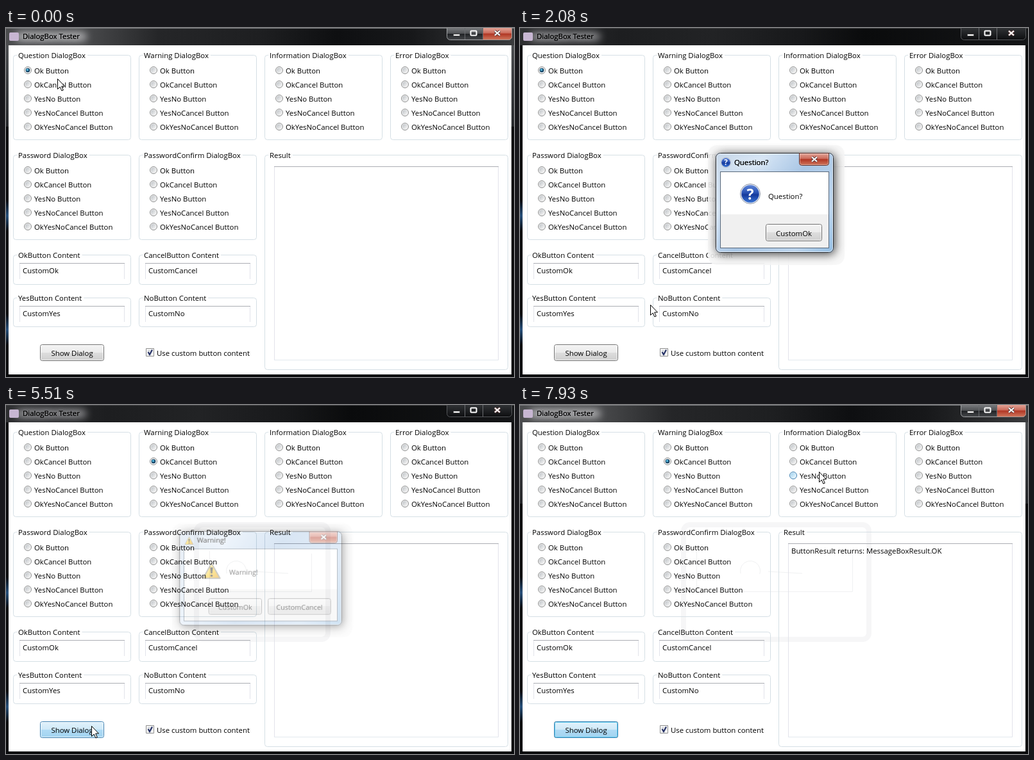
An HTML page with a canvas for the animation above (8 s loop, 792 px wide and 545 px high).

```html
<!DOCTYPE html>
<html lang="en">
<head>
<meta charset="utf-8">
<title>DialogBox Tester</title>
<style>
html, body { margin: 0; width: 100%; height: 100%; overflow: hidden; background: #000; }
canvas { display: block; width: 792px; height: 545px; }
</style>
</head>
<body>
<canvas id="stage" width="792" height="545"></canvas>
<script>
const stage = document.getElementById('stage').getContext('2d');
const sheet = document.createElement('canvas');
sheet.width = 792;
sheet.height = 545;
const layer = sheet.getContext('2d');
let c = stage;

const LOOP = 8000;
const FONT = '"Open Sans", "Noto Sans", sans-serif';
const clamp = v => Math.max(0, Math.min(1, v));
const ramp = (t, start, length) => clamp((t - start) / length);

// time, x, y of the pointer
const PATH = [
  [0, 80, 79], [460, 80, 79], [800, 38, 300], [1080, 58, 526], [1260, 92, 507],
  [1780, 92, 507], [2080, 203, 432], [2680, 400, 318], [3150, 400, 318],
  [3660, 310, 140], [4080, 277, 90], [4310, 277, 90], [4500, 250, 150],
  [5150, 133, 501], [5580, 133, 501], [5990, 238, 404], [6210, 345, 338],
  [6440, 360, 318], [6850, 360, 318], [7380, 409, 221], [7880, 466, 104], [8000, 466, 104]
];
const CLICKS = [[1310, 1470], [2860, 3110], [4120, 4290], [5200, 5380], [6620, 6840]];
const KINDS = ['Ok', 'OkCancel', 'YesNo', 'YesNoCancel', 'OkYesNoCancel'];
const GROUPS = [
  ['Question', 11, 42], ['Warning', 207, 42], ['Information', 403, 42],
  ['Error', 599, 42], ['Password', 11, 198], ['PasswordConfirm', 207, 198]
];
const FIELDS = [['Ok', 11, 354, 46], ['Cancel', 207, 354, 46], ['Yes', 11, 421, 45], ['No', 207, 421, 45]];
const DIALOGS = [
  { text: 'Question?', x: 305, w: 184, open: 1550, close: 3150, icon: question, iconX: 359, textX: 387,
    buttons: [['CustomOk', 383, 88]] },
  { text: 'Warning!', x: 263, w: 268, open: 5430, close: 6870, icon: warning, iconX: 316, textX: 345,
    buttons: [['CustomOk', 311, 88], ['CustomCancel', 409, 104]] }
];
const SKINS = {
  normal: ['#f4f4f4', '#ebebeb', '#dddddd', '#cfcfcf', '#707070'],
  hover: ['#e2f2fb', '#cfe9f8', '#b0dbf5', '#a1d3f0', '#3c7fb1'],
  pressed: ['#e1f2fb', '#c4e5f6', '#98d1ef', '#7fc1e6', '#2c628b']
};
let mouse;

function gradient(x0, y0, x1, y1, ...stops) {
  const g = c.createLinearGradient(x0, y0, x1, y1);
  stops.forEach(([at, color]) => g.addColorStop(at, color));
  return g;
}
function rect(x, y, w, h, color) {
  c.fillStyle = color;
  c.fillRect(x, y, w, h);
}
function rounded(x, y, w, h, r, fill, stroke, width = 1) {
  c.beginPath();
  c.roundRect(x, y, w, h, r);
  if (fill) { c.fillStyle = fill; c.fill(); }
  if (stroke) { c.strokeStyle = stroke; c.lineWidth = width; c.stroke(); }
}
function shape(points, fill, stroke, width = 1) {
  c.beginPath();
  for (let i = 0; i < points.length; i += 2) c.lineTo(points[i], points[i + 1]);
  c.closePath();
  c.fillStyle = fill;
  c.fill();
  if (stroke) { c.strokeStyle = stroke; c.lineWidth = width; c.stroke(); }
}
function disc(x, y, r, fill, stroke) {
  c.beginPath();
  c.arc(x, y, r, 0, 7);
  c.fillStyle = fill;
  c.fill();
  if (stroke) { c.strokeStyle = stroke; c.lineWidth = 1; c.stroke(); }
}
function label(s, x, y, align = 'left') {
  c.font = '11.4px ' + FONT;
  c.textAlign = align;
  c.fillStyle = '#000';
  c.fillText(s, x, y);
}
function glowLabel(s, x, y, color) {
  c.save();
  c.shadowColor = color;
  c.shadowBlur = 8;
  label(s, x, y);
  c.restore();
  label(s, x, y);
}
const inside = (x, y, w, h) =>
  mouse.x >= x && mouse.x < x + w && mouse.y >= y && mouse.y < y + h;

function pointer(t) {
  const i = Math.max(1, PATH.findIndex(p => p[0] > t));
  const [t0, x0, y0] = PATH[i - 1], [t1, x1, y1] = PATH[i];
  const k = (t - t0) / (t1 - t0);
  return { x: Math.round(x0 + (x1 - x0) * k), y: Math.round(y0 + (y1 - y0) * k),
    down: CLICKS.some(([a, b]) => t >= a && t < b) };
}

function button(s, x, y, w, h, focus = 0) {
  const over = inside(x, y, w, h);
  const skin = SKINS[over ? (mouse.down ? 'pressed' : 'hover') : 'normal'];
  const paint = k => gradient(0, y, 0, y + h, [0, k[0]], [.5, k[1]], [.5, k[2]], [1, k[3]]);
  rounded(x + .5, y + .5, w - 1, h - 1, 3, paint(skin), skin[4]);
  rounded(x + 1.5, y + 1.5, w - 3, h - 3, 2, null, 'rgba(255,255,255,.7)');
  if (focus && !over) {
    c.save();
    c.globalAlpha = focus;
    rounded(x + .5, y + .5, w - 1, h - 1, 3, paint(SKINS.hover), '#3c7fb1');
    rounded(x + 1.5, y + 1.5, w - 3, h - 3, 2, null, '#62cdee');
    c.restore();
  }
  label(s, x + w / 2, y + h / 2 + 5, 'center');
}

function radio(x, y, on, over) {
  disc(x, y, 5.5, over ? '#e4f3fc' : '#f4f4f4', over ? '#3c7fb1' : '#8e8f8f');
  const tones = over ? ['#a5d4f0', '#e8f6fd'] : ['#c4c8cc', '#f3f3f3'];
  disc(x, y, 4, gradient(x - 3, y - 3, x + 3, y + 3, [0, tones[0]], [1, tones[1]]));
  if (on) {
    disc(x, y, 3.3, '#17486a');
    disc(x - .6, y - .7, 1.8, '#54b6dc');
  }
}

function group(title, x, y, w, h) {
  rounded(x + .5, y + .5, w - 1, h - 1, 4, null, '#d5dfe5');
  c.font = '11.4px ' + FONT;
  rect(x + 6, y - 1, c.measureText(title).width + 5, 3, '#fff');
  label(title, x + 8, y + 5);
}

function textBox(x, y, w, h, closed) {
  rect(x, y, 1, h, '#e2e3ea');
  rect(x + w - 1, y, 1, h, '#e2e3ea');
  if (closed) rect(x, y + h - 1, w, 1, '#e3e9ef');
  rect(x, y, w, 1, '#abadb3');
}

function cross(x, y) {
  for (const [width, color] of [[4.2, '#5b3a3a'], [2.2, '#fff']]) {
    c.beginPath();
    c.moveTo(x - 4, y - 3.5); c.lineTo(x + 4, y + 3.5);
    c.moveTo(x + 4, y - 3.5); c.lineTo(x - 4, y + 3.5);
    c.strokeStyle = color;
    c.lineWidth = width;
    c.stroke();
  }
}
const red = (y, h) => gradient(0, y, 0, y + h,
  [0, '#e3a497'], [.45, '#cb6a5a'], [.5, '#b03523'], [1, '#cf745b']);

function windowFrame(active) {
  rect(0, 0, 792, 545, '#07080a');
  if (active) {
    rect(0, 0, 792, 27, gradient(0, 0, 792, 0, [0, '#4b4c4e'], [.16, '#48494b'], [.3, '#252628'],
      [.5, '#1e1f21'], [.65, '#0e0f11'], [.8, '#17181a'], [1, '#3a3b3d']));
    for (const x of [0, 788]) rect(x, 27, 4, 127, gradient(0, 27, 0, 154, [0, '#4c4e51'], [1, '#26282b']));
  } else {
    rect(0, 0, 792, 27, gradient(0, 0, 792, 0, [0, '#2e2f31'], [.2, '#1d1e20'], [.38, '#222325'],
      [.55, '#18191b'], [.68, '#0a0b0c'], [1, '#141517']));
  }
  for (const y of [268, 446]) {
    rect(0, y, 4, 50, gradient(0, y, 0, y + 50, [0, '#07080a'], [.5, '#28517c'], [1, '#07080a']));
  }
  rect(0, 0, 792, 1, active ? '#77797c' : '#404143');
  rect(4, 27, 784, 514, '#fff');

  c.save();
  c.filter = 'blur(6px)';
  rounded(14, 6, 112, 15, 8, active ? 'rgba(205,205,208,.7)' : 'rgba(185,185,188,.6)');
  c.restore();
  rounded(5, 7, 15, 13, 2, '#c7b6d2');
  glowLabel('DialogBox Tester', 26, 17, 'rgba(225,225,228,.7)');

  const glass = active
    ? gradient(0, 0, 0, 18, [0, '#77797c'], [.48, '#4e5053'], [.5, '#1e2023'], [1, '#45474a'])
    : gradient(0, 0, 0, 18, [0, '#303235'], [1, '#0e0f11']);
  rounded(687.5, -4, 101, 22.5, 5, glass, active ? '#a0a2a5' : '#55575a');
  if (active) rounded(743.5, -4, 45, 22.5, [0, 0, 5, 0], red(0, 18), '#a99b98');
  rect(715, 0, 1, 18, '#6a6c6f');
  rect(743, 0, 1, 18, '#6a6c6f');
  rounded(697.5, 9.5, 10, 3, 1, '#fff', '#444');
  rounded(724.5, 4.5, 9, 7, 1, null, '#fff', 2);
  cross(766, 8);
}

function question(x, y, s) {
  c.save();
  c.translate(x, y);
  c.scale(s, s);
  disc(0, 0, 15.5, '#e9edf4', '#8d96a8');
  disc(0, 0, 13.8, gradient(0, -14, 0, 14, [0, '#5f86d8'], [.45, '#2750b2'], [.55, '#153a9c'], [1, '#3a74d4']));
  c.font = 'bold 23px ' + FONT;
  c.textAlign = 'center';
  c.fillStyle = '#fff';
  c.fillText('?', 0, 8.5);
  c.restore();
}

function warning(x, y, s) {
  c.save();
  c.translate(x, y + 2 * s);
  c.scale(s, s);
  c.lineJoin = 'round';
  shape([0, -13, 14, 12, -14, 12], gradient(-8, -8, 10, 12, [0, '#ffe873'], [.5, '#fbc714'], [1, '#e79a06']), '#8d8a7c', 2);
  shape([-2.3, -6, 2.3, -6, 1.2, 4, -1.2, 4], '#1c1c1c');
  disc(0, 7.6, 1.9, '#1c1c1c');
  c.restore();
}

// faint outline that the latest closed dialog leaves on the window
function trace(t) {
  const d = DIALOGS.filter(d => t >= d.close + 150).pop();
  if (!d) return;
  rounded(d.x - 8, 187, d.w + 21, 179, 10, null, '#f6f6f7', 8);
  c.beginPath();
  c.moveTo(d.x + 12.5, 228);
  c.lineTo(d.x + 12.5, 291.5);
  c.lineTo(d.x + d.w - 12.5, 291.5);
  c.lineTo(d.x + d.w - 12.5, 232);
  c.moveTo(344, 262);
  c.arc(359, 259, 15.5, 2.9, 6.6);
  c.moveTo(387, 260);
  c.lineTo(440, 263);
  c.strokeStyle = '#f0f1f2';
  c.lineWidth = 1;
  c.stroke();
}

function paintDialog({ text, x, w, icon, iconX, textX, buttons }) {
  const end = x + w;
  rounded(x - 12, 183, w + 29, 187, 14, 'rgba(247,247,247,.88)');
  c.save();
  c.shadowColor = 'rgba(0,0,0,.75)';
  c.shadowBlur = 15;
  c.shadowOffsetX = c.shadowOffsetY = 2;
  rounded(x, 195, w, 156, 7, '#b9d0ea');
  c.restore();
  rounded(x + .5, 195.5, w - 1, 155, 7,
    gradient(x, 195, end, 351, [0, '#c7d7e8'], [.25, '#d6e5f5'], [.5, '#a9c6e5'], [.8, '#bdd5ed'], [1, '#92bde3']), '#20262e');
  rounded(x + 1.5, 196.5, w - 3, 153, 6, null, 'rgba(255,255,255,.7)');
  rect(x + 7, 224, w - 14, 120, '#59697b');
  rect(x + 8, 225, w - 16, 118, '#fff');
  rect(x + 8, 291, w - 16, 52, '#f0f0f0');

  icon(x + 16, 210, .5);
  glowLabel(text, x + 29, 214, 'rgba(255,255,255,.8)');
  rounded(end - 53.5, 195.5, 46, 19, [0, 0, 4, 4], red(196, 18), '#5c2a24');
  rounded(end - 52.5, 196.5, 44, 17, [0, 0, 3, 3], null, 'rgba(255,255,255,.4)');
  cross(end - 30, 205);

  icon(iconX, 259, 1);
  label(text, textX, 267);
  for (const [s, bx, bw] of buttons) button(s, bx, 306, bw, 27);
}

function dialog(d, t) {
  const a = ramp(t, d.open, 180) * (1 - ramp(t, d.close, 180));
  if (!a) return;
  layer.clearRect(0, 0, 792, 545);
  c = layer;
  paintDialog(d);
  c = stage;

  const s = .9 + .1 * a;
  c.save();
  c.globalAlpha = a;
  // while still faint, the text below shows through in full
  if (a < .6) c.globalCompositeOperation = 'multiply';
  c.translate(397, 230);
  c.scale(s, s);
  c.drawImage(sheet, -397, -230);
  c.restore();
}

function cursor() {
  const { x, y, down } = mouse;
  if (down) disc(x - 1, y + 1, 12, 'rgba(232,227,50,.8)');
  c.save();
  c.translate(x + .5, y + .5);
  shape([0, 0, 0, 16, 3.7, 12.5, 6.4, 18.5, 8.8, 17.5, 6.2, 11.5, 11, 11.5], '#fff', '#000');
  c.restore();
}

function draw(t) {
  mouse = pointer(t);
  const isOpen = DIALOGS.some(d => t >= d.open && t < d.close + 60);
  windowFrame(!isOpen);
  trace(t);

  const chosen = t < 4290 ? 0 : 1;
  GROUPS.forEach(([name, x, y], g) => {
    group(name + ' DialogBox', x, y, 184, 133);
    KINDS.forEach((kind, i) => {
      const cy = y + 24 + 22 * i;
      const over = !isOpen && inside(x + 17, cy - 7, 140, 14);
      radio(x + 23, cy, g === chosen && i === chosen, over);
      label(kind + ' Button', x + 33, cy + 5);
    });
  });
  FIELDS.forEach(([name, x, y, h]) => {
    group(name + 'Button Content', x, y, 184, h + 1);
    textBox(x + 10, y + 13, 164, 25);
    label('Custom' + name, x + 15, y + 29);
  });
  group('Result', 403, 198, 380, 336);
  textBox(418, 216, 350, 303, true);
  const hasResult = t >= 3740 && t < DIALOGS[1].open || t >= 7330;
  if (hasResult) label('ButtonResult returns: MessageBoxResult.OK', 423, 232);

  const focus = .7 * ramp(t, 3210, 700) * (1 - ramp(t, 4290, 200)) + ramp(t, 6930, 420);
  button('Show Dialog', 53, 494, 100, 26, focus);

  rounded(218.5, 500.5, 12, 12, 0, '#f4f4f4', '#8e8f8f');
  rect(221, 503, 8, 8, gradient(221, 503, 229, 511, [0, '#cfd3d8'], [1, '#f6f6f6']));
  c.beginPath();
  c.moveTo(221.5, 506); c.lineTo(224, 510); c.lineTo(228, 502.5);
  c.strokeStyle = '#1f2b62';
  c.lineWidth = 2;
  c.stroke();
  label('Use custom button content', 235, 512);

  DIALOGS.forEach(d => dialog(d, t));
  cursor();
}

const began = performance.now();
function tick() {
  draw((performance.now() - began) % LOOP);
  requestAnimationFrame(tick);
}
tick();
</script>
</body>
</html>
```
